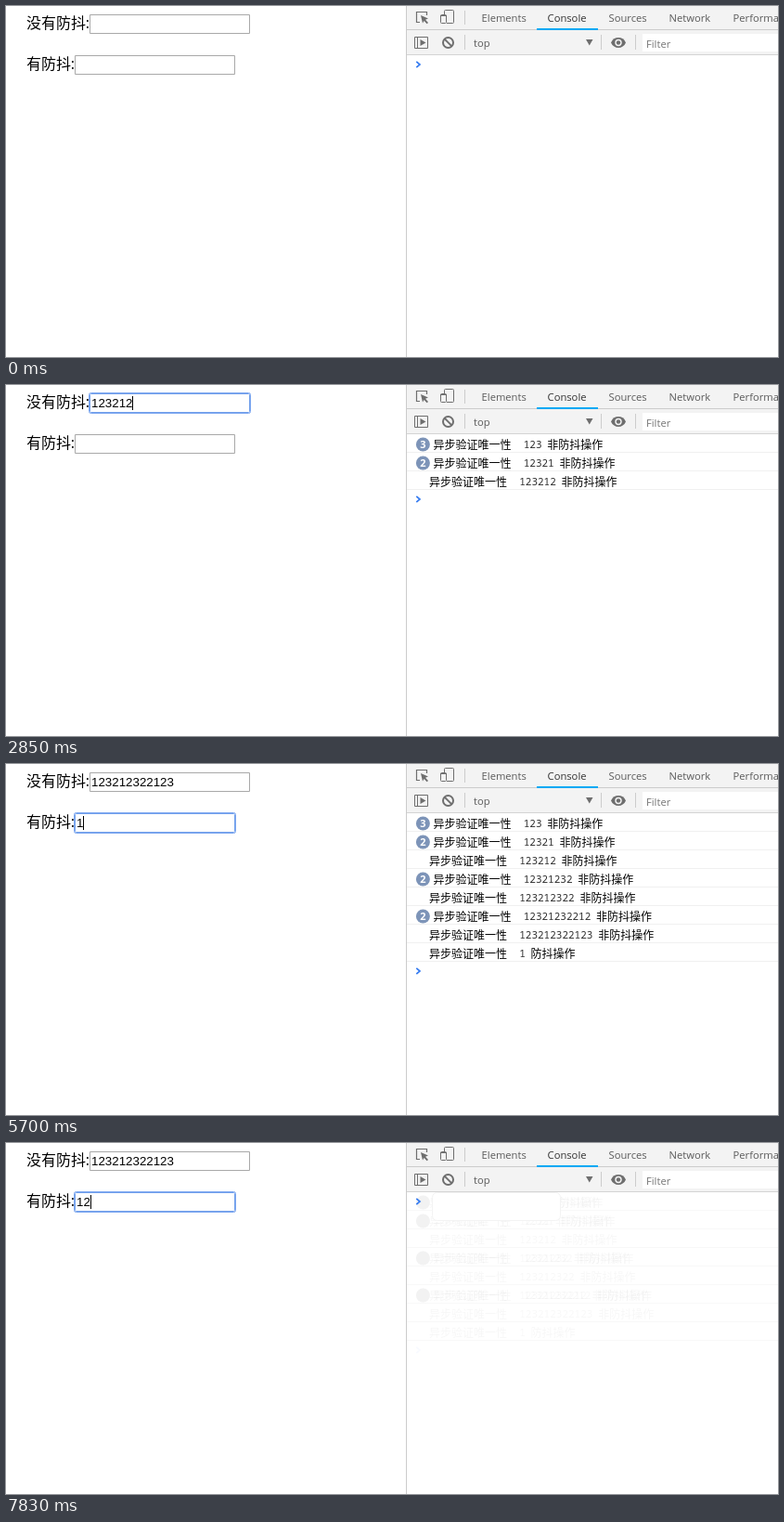
These frames come from a looping animation (832x378 px, 8000 ms). An HTML page with a canvas:

```html
<!DOCTYPE html>
<html lang="zh">
<head>
<meta charset="utf-8">
<title>Debounce demo</title>
<style>
html, body { margin: 0; width: 100%; height: 100%; overflow: hidden; background: #fff; }
canvas { display: block; }
</style>
</head>
<body>
<canvas id="stage" width="832" height="378"></canvas>
<script>
const ctx = document.getElementById('stage').getContext('2d');
const LOOP = 8000;
const CJK = '"Noto Sans CJK SC", "Noto Sans CJK", sans-serif';
const UI = '11.2px "Open Sans", "Noto Sans", sans-serif';
const MONO = '11px "Noto Sans Mono", "DejaVu Sans Mono", monospace';
const ARIAL = '13.333px "Liberation Sans", Arial, sans-serif';
const DIGIT = 7.415;

// Key press times for the two fields
const plain = {
  x: 90, y: 9, label: '没有防抖', value: '123212322123',
  keys: [1380, 1560, 1620, 1920, 2010, 2700, 2940, 3030, 3330, 3630, 3810, 3960],
  focus: [[1110, 4320]],
  caret: [[1110, 2490], [2700, 4320]]
};
const debounced = {
  x: 74, y: 53, label: '有防抖', value: '12',
  keys: [4590, 7830],
  focus: [[4320, 6690], [7590, LOOP]],
  caret: [[4320, 5100], [5580, 6090], [6600, 6690], [7590, LOOP]]
};
// Console messages: time, typed length
const plainLogs = [
  [1680, 3], [1710, 3], [1770, 3], [2070, 5], [2160, 5], [2850, 6], [3090, 8],
  [3180, 8], [3450, 9], [3810, 11], [3960, 11], [4050, 12]
];
const logs = plainLogs.map(([at, n]) => ({ at, text: plain.value.slice(0, n), tail: '非防抖操作' }));
logs.push({ at: 5610, text: '1', tail: '防抖操作' });
const CLEARED = 6870;

const within = (spans, t) => spans.some(([a, b]) => t >= a && t < b);
const clamp = v => Math.max(0, Math.min(1, v));

function rect(x, y, w, h, color) {
  ctx.fillStyle = color;
  ctx.fillRect(x, y, w, h);
}

function text(s, x, y, font, color) {
  ctx.font = font;
  ctx.fillStyle = color;
  ctx.fillText(s, x, y);
}

function poly(points, color, close = true) {
  ctx.beginPath();
  points.forEach(([x, y]) => ctx.lineTo(x, y));
  if (close) {
    ctx.fillStyle = color;
    ctx.fill();
  } else {
    ctx.strokeStyle = color;
    ctx.stroke();
  }
}

function disc(x, y, r, color) {
  ctx.beginPath();
  ctx.arc(x, y, r, 0, Math.PI * 2);
  ctx.fillStyle = color;
  ctx.fill();
}

function frame(x, y, w, h, color, radius = 0) {
  ctx.beginPath();
  ctx.roundRect(x + .5, y + .5, w - 1, h - 1, radius);
  ctx.strokeStyle = color;
  ctx.lineWidth = 1;
  ctx.stroke();
}

function field(f, t) {
  const { x, y } = f;
  text(f.label, 22, y + 15, '16px ' + CJK, '#000');
  text(':', x - 4.2, y + 15, '16px "Open Sans", sans-serif', '#000');
  if (within(f.focus, t)) {
    frame(x - 1, y - 1, 175, 23, '#7ea8f0', 2);
    frame(x, y, 173, 21, '#719feb', 1);
  } else {
    frame(x, y, 173, 21, '#a9a9a9');
  }
  const typed = f.keys.filter(k => k <= t).length;
  text(f.value.slice(0, typed), x + 2, y + 15, ARIAL, '#000');
  if (within(f.caret, t)) rect(Math.round(x + 2 + typed * DIGIT), y + 3, 1, 15, '#000');
}

function inspectIcon() {
  ctx.lineWidth = 1.2;
  poly([[446, 17.5], [442.5, 17.5], [442.5, 6.5], [453.5, 6.5], [453.5, 10]], '#6e6e6e', false);
  poly([[447, 10], [455, 13.5], [452, 14.7], [455, 18], [453.6, 19.2], [450.6, 16], [449, 18.6]], '#6e6e6e');
}

function deviceIcon() {
  frame(472, 4, 11, 15, '#6e6e6e', 1);
  rect(468, 9, 7, 10, '#f3f3f3');
  frame(468, 9, 7, 10, '#6e6e6e', 1);
  rect(468, 10, 7, 1, '#6e6e6e');
}

function sidebarIcon() {
  frame(440, 33, 15, 13, '#6e6e6e');
  rect(443, 33, 1, 13, '#6e6e6e');
  poly([[446.5, 36], [452.5, 39.5], [446.5, 43]], '#6e6e6e');
}

function clearIcon() {
  ctx.lineWidth = 2;
  ctx.strokeStyle = '#6e6e6e';
  ctx.beginPath();
  ctx.arc(476.5, 39.5, 5.5, 0, Math.PI * 2);
  ctx.stroke();
  poly([[472.6, 35.6], [480.4, 43.4]], '#6e6e6e', false);
}

function eyeIcon() {
  ctx.beginPath();
  ctx.moveTo(652, 39.5);
  ctx.bezierCurveTo(655, 32.2, 665, 32.2, 668, 39.5);
  ctx.bezierCurveTo(665, 46.8, 655, 46.8, 652, 39.5);
  ctx.fillStyle = '#6e6e6e';
  ctx.fill();
  disc(660, 39.5, 3.7, '#f3f3f3');
  disc(660, 39.5, 2.2, '#6e6e6e');
}

function toolbars() {
  rect(431, 0, 1, 378, '#cbcbcb');
  rect(432, 0, 400, 52, '#f3f3f3');
  rect(432, 25, 400, 1, '#cccccc');
  rect(432, 52, 400, 1, '#d4d4d4');
  rect(572, 24, 66, 2, '#03a9f4');
  rect(494, 5, 1, 15, '#cccccc');
  [494, 641, 678].forEach(x => rect(x, 31, 1, 16, '#cccccc'));
  const tabs = [['Elements', 512.6], ['Console', 583.6], ['Sources', 649.6], ['Network', 714.6], ['Performance', 783.6]];
  tabs.forEach(([name, x]) => text(name, x, 17, UI, name === 'Console' ? '#333' : '#5a5a5a'));
  text('top', 504, 44, UI, '#5a5a5a');
  poly([[625, 36], [632.5, 36], [628.75, 42.5]], '#6e6e6e');
  rect(686, 30, 146, 19, '#fff');
  text('Filter', 690, 45, UI, '#757575');
  inspectIcon();
  deviceIcon();
  sidebarIcon();
  clearIcon();
  eyeIcon();
}

function prompt(row) {
  const y = 63 + row * 20;
  ctx.lineWidth = 1.7;
  poly([[442.3, y - 3.2], [446, y], [442.3, y + 3.2]], '#367cf1', false);
}

// Merge equal neighbours into one row with a count
function rowsAt(t) {
  const rows = [];
  for (const { at, text, tail } of logs) {
    if (at > t) continue;
    const last = rows[rows.length - 1];
    if (last && last.text === text) last.count++;
    else rows.push({ text, tail, count: 1 });
  }
  return rows;
}

function message(row, x, y) {
  text('异步验证唯一性', x, y + 4.5, '12px ' + CJK, '#000');
  text(row.text, x + 97.2, y + 4, MONO, '#303030');
  text(row.tail, x + 103 + row.text.length * 6.6, y + 4.5, '12px ' + CJK, '#000');
}

function drawRow(row, i) {
  const y = 64 + i * 20;
  rect(432, y + 8, 400, 1, '#f0f0f0');
  if (row.count > 1) {
    disc(449.4, y, 7.5, '#7d94b8');
    ctx.textAlign = 'center';
    text(row.count, 449.4, y + 4, 'bold 11px "Open Sans", sans-serif', '#fff');
    ctx.textAlign = 'left';
  }
  message(row, row.count > 1 ? 460.5 : 456, y);
}

function tooltip(alpha) {
  if (!alpha) return;
  ctx.globalAlpha = alpha;
  ctx.beginPath();
  ctx.roundRect(459, 53, 138, 28, 3);
  ctx.fillStyle = '#f2f2f2';
  ctx.fill();
  frame(459, 53, 138, 28, '#d0d0d0', 3);
  text('Clear console', 471, 72, UI, '#333');
  text('Ctrl + L', 550, 72, UI, '#777');
  ctx.globalAlpha = 1;
}

// Faint afterimage left once the console is emptied
function afterimage(rows) {
  ctx.globalAlpha = .035;
  rows.forEach((row, i) => {
    drawRow(row, i);
    if (row.count > 1) message(row, 456, 64 + i * 20);
  });
  prompt(rows.length);
  ctx.globalAlpha = 1;
  rows.forEach((row, i) => {
    if (row.count > 1) disc(449.4, 64 + i * 20, 7.5, '#f2f2f2');
    rect(432, 72 + i * 20, 400, 1, '#f8f8f8');
  });
  ctx.beginPath();
  ctx.roundRect(459, 53, 139, 31, 5);
  ctx.fillStyle = '#fff';
  ctx.fill();
  frame(459, 53, 139, 31, '#f3f3f3', 5);
}

function draw(t) {
  rect(0, 0, 832, 378, '#fff');
  field(plain, t);
  field(debounced, t);
  const rows = rowsAt(t);
  if (t < CLEARED) {
    rows.forEach(drawRow);
    prompt(rows.length);
    const tick = Math.floor(t / 30) * 30;
    tooltip(tick < 6300 ? clamp((tick - 5790) / 150) : clamp((6780 - tick) / 120));
  } else {
    afterimage(rows);
    prompt(0);
  }
  toolbars();
}

const start = performance.now();
function loop() {
  draw((performance.now() - start) % LOOP);
  requestAnimationFrame(loop);
}
loop();
</script>
</body>
</html>
```
